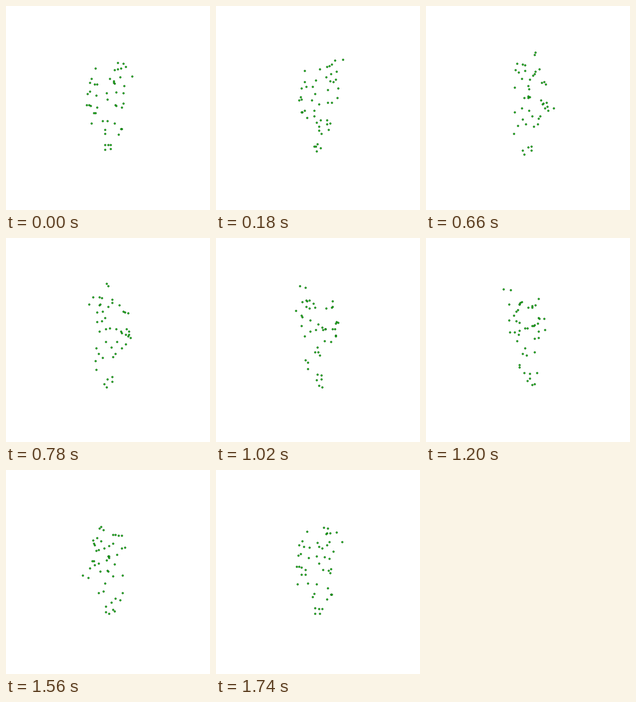
A matplotlib script that plays this animation: 256 px wide and 256 px high, repeating every 1.8 s.

```python
import numpy as np
import matplotlib.pyplot as plt
from matplotlib.animation import FuncAnimation

SIZE, FRAMES, STEP_MS = 256, 30, 60
CX, CY = 128, 127          # vanishing centre on the stage
DEPTH, TILT = 210, 0.55    # camera distance and downward tilt

# Cloud at rest: right, away from the viewer, screen height.
CLOUD = np.array([
    (10, -20, 65), (15.7, -27, 63.5), (29, -2, 87), (22, 1, 76.3),
    (15, -3, 76.3), (11, -3.5, 77), (8.3, 9.3, 82), (-16.5, 6, 79),
    (14.5, -6.5, 86), (-21, -1.5, 89.5), (1, -13.5, 85), (7, -13.5, 91.3),
    (7.5, 16.5, 99.5), (6, -26, 85), (-23, -7, 92.5), (-16.2, -10.5, 93),
    (-16, 14.5, 103.5), (19.5, -5, 97.5), (-24, 2.5, 107.5), (-27, 2, 110),
    (-16.5, 14.5, 118), (-3, 4, 110), (8.7, -7.5, 104), (16.7, -18, 100.5),
    (-2, 12.5, 122.5), (-27, -5.5, 121), (-23.4, -5.3, 120.2),
    (-14.2, -10.5, 120.5), (7.7, -9.3, 119), (10.5, 14, 132),
    (16, -7, 122.5), (17.5, -16, 113.5), (-17.5, -16, 124), (-17, 0, 133),
    (-18.5, -26, 129.4), (-7, -26, 127), (-1, -5.5, 139.7), (8.6, 16, 156.5),
    (15.7, -4, 150.5), (16.3, 4, 156), (11.7, -6, 156), (-4, -5.7, 151),
    (-4.7, -12.2, 150.5), (-23, 3, 126), (-4.5, -0.5, 172.8), (-1, 8.5, 180),
    (3, 7, 178.5), (2, -1, 178), (-4, -1, 179),
])


def project(angle):
    """Turn the cloud about its upright axis and project it to pixels."""
    u, v, h = CLOUD.T
    c, s = np.cos(angle), np.sin(angle)
    right, away = u * c - v * s, u * s + v * c
    zoom = 1 / (1 + away / DEPTH)
    return CX + zoom * right, CY + zoom * (h - CY - TILT * away)


fig = plt.figure(figsize=(SIZE / 100, SIZE / 100), dpi=100, facecolor="white")
ax = fig.add_axes([0, 0, 1, 1])
ax.set(xlim=(0, SIZE), ylim=(SIZE, 0))
ax.axis("off")
dots, = ax.plot([], [], ls="", marker="o", ms=1.3, mfc="#00c800",
                mec="#005a00", mew=0.45)


def update(i):
    x, y = project(2 * np.pi * i / FRAMES)
    dots.set_data(x + 0.5, y + 0.5)
    return dots,


anim = FuncAnimation(fig, update, frames=FRAMES, interval=STEP_MS,
                     repeat=True, repeat_delay=0, blit=False)
plt.show()
```
